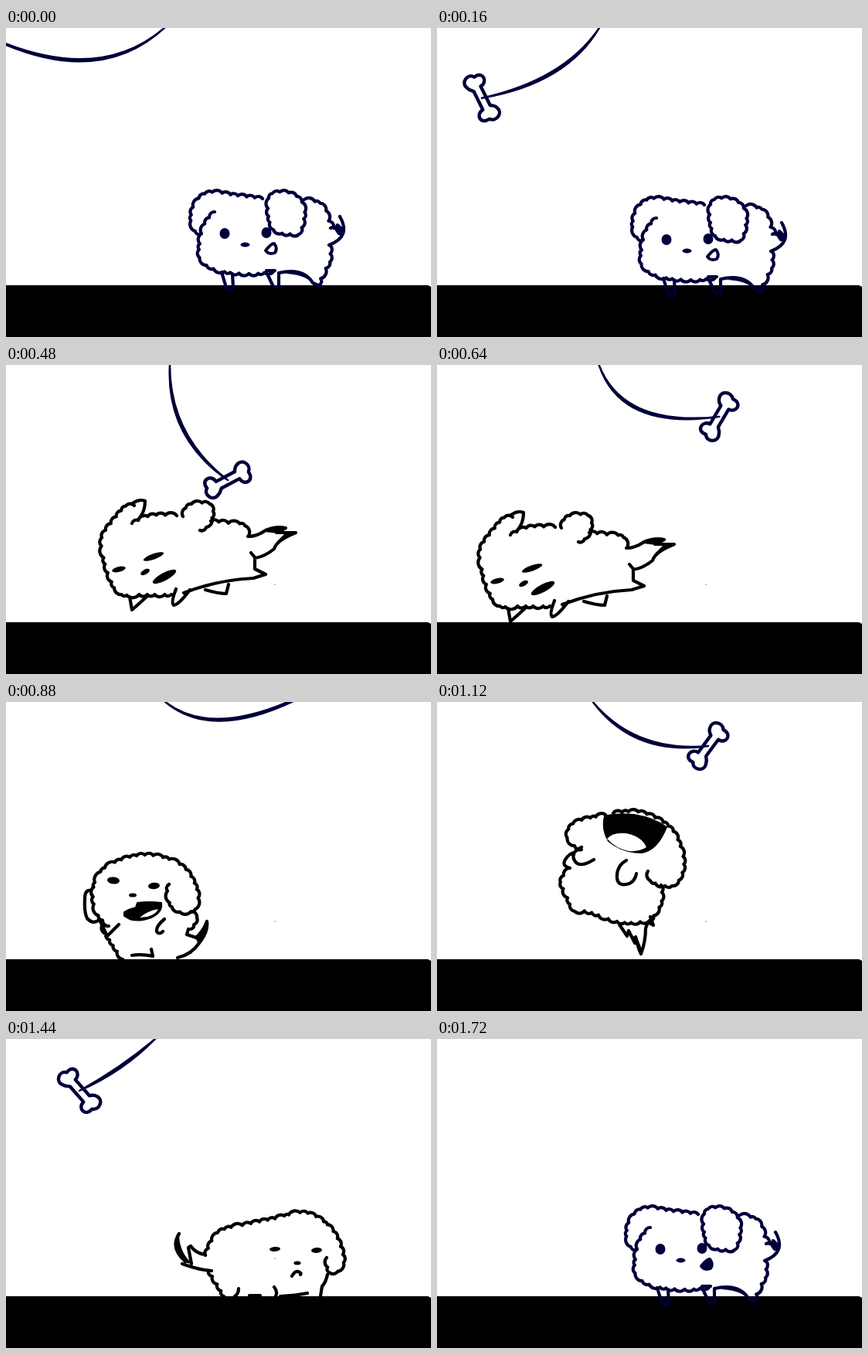
An HTML page that plays this animation: 550 px wide and 400 px high, repeating every 1.76 s.

```html
<!DOCTYPE html>
<html lang="en">
<head>
<meta charset="utf-8">
<title>Puppy and bone</title>
<style>
html, body { margin: 0; width: 100%; height: 100%; overflow: hidden; background: #fff; }
svg { display: block; width: 100vw; height: 100vh; }
path { stroke-linecap: round; stroke-linejoin: round; }
</style>
</head>
<body>
<svg id="stage" viewBox="0 0 550 400">
  <path d="M0 333H546L550 335V400H0Z"/>
  <g id="dogs"></g>
  <ellipse id="fleck" cx="348" cy="284" rx="1.4" ry=".6" fill="#888"/>
  <g id="toy" stroke="#00003a">
    <path id="bone" fill="#fff" stroke-width="4" d="M-13-5C-14-16-29-15-26-3C-34 2-27 15-18 10C-14 9-13 6-11 5L13 5C14 16 28 15 26 3C33-3 27-15 18-11C15-10 13-7 12-5Z"/>
    <path id="cord" fill="#00003a" stroke-width="2.4"/>
  </g>
</svg>
<script>
const NAVY = '#00003a', LOOP = 1760, TURN = 1600;
const $ = id => document.getElementById(id);

function add(parent, tag, attrs) {
  const el = document.createElementNS('http://www.w3.org/2000/svg', tag);
  for (const k in attrs) el.setAttribute(k, attrs[k]);
  parent.appendChild(el);
  return el;
}

let seed = 7;
const random = () => (seed = seed * 16807 % 2147483647) / 2147483647;

// Smooth path through a few points.
function smooth(pts) {
  const at = i => pts[Math.max(0, Math.min(pts.length - 1, i))];
  const handle = (i, s) => at(i).map((v, k) => v + s * (at(i + 1)[k] - at(i - 1)[k]) / 6);
  return pts.map((p, i) => i ? `C${handle(i - 1, 1)} ${handle(i, -1)} ${p}` : `M${p}`).join('');
}

// Uneven outward bumps along a smooth clockwise curve.
function fur(text) {
  const spine = add($('stage'), 'path', { d: smooth(text.split(' ').map(p => p.split(',').map(Number))) });
  const size = spine.getTotalLength(), n = Math.max(2, Math.round(size / 11));
  let d = '', last;
  for (let i = 0; i <= n; i++) {
    const shift = i % n ? (random() - 0.5) * 0.5 : 0;
    const p = spine.getPointAtLength((i + shift) / n * size);
    const r = i && Math.hypot(p.x - last.x, p.y - last.y) * 0.65;
    d += i ? `A${r} ${r} 0 0 1 ${p.x} ${p.y}` : `M${p.x} ${p.y}`;
    last = p;
  }
  spine.remove();
  return d;
}

// dots: cx, cy, rx, ry, tilt
const poses = {
  stand: {
    ink: NAVY,
    fur: [
      '252,267 240,257 243,230 262,213 298,217 332,221',
      '347,314 320,318 276,314 252,300 251,278 257,254 270,238',
      '379,267 347,262 339,232 345,214 371,215 386,232 383,257 379,267',
      '386,222 410,229 418,251 424,259',
      '419,281 419,303 410,316 405,333'
    ],
    line: 'M420 259L425 257L431 266L429 255L436 262M432 244Q447 270 418 281M353 335V317Q385 310 397 330L406 334M338 318L346 335H355M279 316L285 336Q289 341 294 336L293 318M337 314H348',
    fill: 'M362 318Q385 310 398 331Q386 319 362 318ZM424 258L431 267L429 255L437 264L434 246Q440 259 435 272Z',
    dots: [[283, 266, 6.5, 7], [337, 265, 6.5, 7], [309.5, 280.5, 6, 3]]
  },
  leap: {
    ink: NAVY,
    fur: [
      '312,274 283,268 243,262 219,259 208,233 222,213',
      '220,205 208,188 220,174 258,168 306,175 343,170 363,187 352,206 309,211'
    ],
    line: 'M382 258Q383 272 378 282Q370 288 360 280Q356 276 354 272Q350 282 342 283Q330 281 320 275M319 279Q330 290 349 286M382 262Q390 270 400 272L413 266Q412 255 424 250Q410 259 398 257',
    fill: 'M354 199Q376 207 385 232Q389 251 402 258Q385 256 380 230Q371 210 354 203ZM390 265L414 263L410 272L398 272ZM319 279Q332 285 349 285Q332 293 319 279Z',
    dots: [[239, 195.5, 6.5, 3.6], [278, 193.5, 7, 3.6, -14], [258, 211, 4.5, 2.5, -18]],
    mouth: 'M249 254Q244 236 258 224Q272 213 288 219Q302 226 299 238Q290 250 270 253Q255 258 249 254Z',
    tongue: 'M259 247Q262 238 276 236Q288 235 297 232Q297 244 272 250Q262 252 259 247Z'
  },
  dive: {
    ink: '#000',
    fur: [
      '214,297 176,297 147,296 134,274 127,252 124,224 140,200 157,181 166,182',
      '163,205 188,195 221,195',
      '229,196 237,181 266,181 264,205 251,214',
      '265,202 290,205 308,207 314,221'
    ],
    line: 'M164 179Q172 173 180 176Q180 190 172 199M313 222Q325 222 336 214Q350 208 362 211L350 217H375Q350 227 347 238Q335 248 322 250M317 243L322 249V264L336 271L320 276Q275 278 230 295M160 300L163 317Q170 311 182 300M220 290Q213 308 217 311Q224 310 238 291M258 291Q275 296 285 296L288 284',
    fill: 'M335 216L345 211L364 211L350 216H376Q358 226 350 229L360 219Z',
    dots: [[191, 248, 14, 3.6, -20], [146, 264.5, 9, 3.4, -14], [180, 268, 6.5, 3.2, -28], [205, 274, 17, 5, -28]]
  },
  sit: {
    ink: '#000',
    fur: [
      '133,290 116,270 114,237 132,212 180,198 226,211 247,243 244,269 220,270 209,252 211,236',
      '240,271 247,280 239,294',
      '151,333 136,311 124,290'
    ],
    line: 'M109 244Q102 243 102 255Q101 272 105 280Q112 288 119 283M122 284L131 303L146 288M205 281Q194 290 195 297Q198 302 203 297M236 294L234 301L246 305Q256 296 260 284Q262 297 250 312Q240 327 222 331M163 328Q175 326 190 329L188 320',
    fill: 'M235 300L246 304Q256 294 260 283Q264 297 248 313Q249 306 235 303Z',
    dots: [[139, 231, 8, 4.5, 5], [191.5, 238, 7.5, 4.2, -5], [164, 250, 5, 2.6]],
    mouth: 'M153 272Q160 268 168 266L170 260Q185 258 201 260Q203 272 188 279Q172 285 160 281L153 277Z',
    tongue: 'M173 279Q184 270 197 268Q194 275 183 278Z'
  },
  hop: {
    ink: '#000',
    fur: [
      '275,283 238,285 195,271 177,270 167,248 160,232 172,215',
      '187,191 169,178 177,157 218,146',
      '228,144 264,143 302,163 318,198 317,222 304,238 277,232 273,219',
      '290,237 290,260 275,284'
    ],
    line: 'M172 215Q161 212 166 204Q172 195 178 195M187 188Q174 194 177 203Q182 217 203 204M245 205Q232 212 233 228Q234 238 245 236Q256 234 258 222M236 288L246 303L248 296L256 312L257 304Q260 318 264 326Q270 310 270 293L273 285L280 289L276 278',
    fill: 'M253 304L258 302L266 322L264 328Z',
    dots: [],
    mouth: 'M217 148Q213 165 222 180Q240 195 265 195Q285 192 297 162Q280 150 255 146Q232 144 217 148Z',
    tongue: 'M220 177Q228 168 245 170Q265 174 271 188Q262 194 248 193Q232 190 220 177Z'
  },
  sulk: {
    ink: '#000',
    fur: [
      '258,280 275,250 312,240 346,233 388,225 422,247 437,285 428,302 418,302 415,283',
      '282,333 272,315 262,300'
    ],
    line: 'M416 305Q414 315 409 320L407 333M224 252Q212 270 232 288M240 291L236 270L239 268Q246 278 258 279M228 291Q250 299 266 300M301 323Q301 330 296 333M347 321Q352 327 349 333M315 332H329M355 333Q375 332 390 329M370 307Q374 300 378 301Q383 303 381 305',
    fill: 'M224 252Q211 270 234 290L241 291Q224 276 224 252Z',
    dots: [[348, 272, 7, 3, -5], [402, 273.5, 7, 3.4, -4], [377, 290, 4.6, 2.5]]
  }
};

for (const name in poses) {
  const p = poses[name];
  const g = p.el = add($('dogs'), 'g', { fill: p.ink });
  add(g, 'path', { d: p.fur.map(fur).join('') + p.line, fill: 'none', stroke: p.ink, 'stroke-width': 4.2 });
  add(g, 'path', { d: p.fill });
  for (const [cx, cy, rx, ry, tilt = 0] of p.dots)
    add(g, 'ellipse', { cx, cy, rx, ry, transform: `rotate(${tilt} ${cx} ${cy})` });
  if (p.mouth) add(g, 'path', { d: p.mouth, fill: '#000', stroke: '#000', 'stroke-width': 2 });
  if (p.tongue) add(g, 'path', { d: p.tongue, fill: '#fff' });
}
const lips = add(poses.stand.el, 'path', { d: 'M336 288Q343 279 347 279Q352 285 348 291Q340 294 336 288Z', stroke: NAVY, 'stroke-width': 4 });

// Each pose drifts steadily through its place (x, y) at time mid.
const moves = [
  { pose: 'stand', from: 0, mid: 0, x: 0, y: 0, vx: 7, vy: 4 },
  { pose: 'leap', from: 240, mid: 320, x: 0, y: 0, vx: -31, vy: -4 },
  { pose: 'dive', from: 480, mid: 480, x: 0, y: 0, vx: -34, vy: 7.5 },
  { pose: 'sit', from: 720, mid: 880, x: 0, y: 0, vx: 15, vy: 0 },
  { pose: 'hop', from: 1040, mid: 1120, x: 0, y: 0, vx: 30, vy: 0 },
  { pose: 'sulk', from: 1280, mid: 1440, x: 0, y: 0, vx: 4, vy: 5 },
  { pose: 'stand', from: 1640, mid: 1720, x: 6, y: 6, vx: -1, vy: -2 }
];

// time, cord top x, bend x y, bone x y
const swing = [
  [0, 206, 112, 84, -45, 0],
  [320, 214, 212, 62, 164, 165],
  [480, 212, 209, 92, 287, 149],
  [880, 205, 281, 62, 440, -40],
  [1120, 201, 255, 68, 351, 57],
  [1280, 200, 200, 60, 222, 108],
  [1440, 194, 150, 40, 95, 67],
  [TURN, 190, 110, 20, -45, -40]
];

// Smooth value of every column at time t.
function swingAt(t) {
  const i = swing.findIndex(k => k[0] > t) - 1;
  const a = swing[i], b = swing[i + 1], span = b[0] - a[0], u = (t - a[0]) / span;
  const slope = (k, j) => {
    const p = swing[Math.max(0, k - 1)], q = swing[Math.min(swing.length - 1, k + 1)];
    return (q[j] - p[j]) / (q[0] - p[0]) * span;
  };
  return a.map((v, j) => v + (b[j] - v) * u * u * (3 - 2 * u)
    + slope(i, j) * u * (1 - u) ** 2 - slope(i + 1, j) * u * u * (1 - u));
}

function drawToy(t) {
  const [, top, cx, cy, x, y] = swingAt(t);
  const len = Math.hypot(x - top, y), nx = -6 * y / len, ny = 6 * (x - top) / len;
  $('bone').setAttribute('transform', `translate(${x} ${y}) rotate(${(217 - x) * 0.4}) scale(1.1)`);
  $('cord').setAttribute('d', `M${top} -1Q${cx - nx / 2} ${cy - ny / 2} ${x} ${y}Q${cx + nx / 2} ${cy + ny / 2} ${top} -1Z`);
}

function draw(now) {
  const raw = now % LOOP, step = raw < TURN ? 80 : 40;
  const t = Math.floor(raw / step) * step;

  const m = moves.filter(m => m.from <= t).pop(), beats = (t - m.mid) / 80;
  for (const name in poses) poses[name].el.style.display = name === m.pose ? '' : 'none';
  poses[m.pose].el.setAttribute('transform', `translate(${m.x + m.vx * beats} ${m.y + m.vy * beats})`);
  lips.setAttribute('fill', t < TURN ? '#fff' : NAVY);

  $('fleck').style.display = t >= 480 && t < TURN ? '' : 'none';
  $('toy').style.display = t < TURN ? '' : 'none';
  if (t < TURN) drawToy(t);
}

function tick() {
  draw(performance.now());
  requestAnimationFrame(tick);
}
tick();
</script>
</body>
</html>
```
